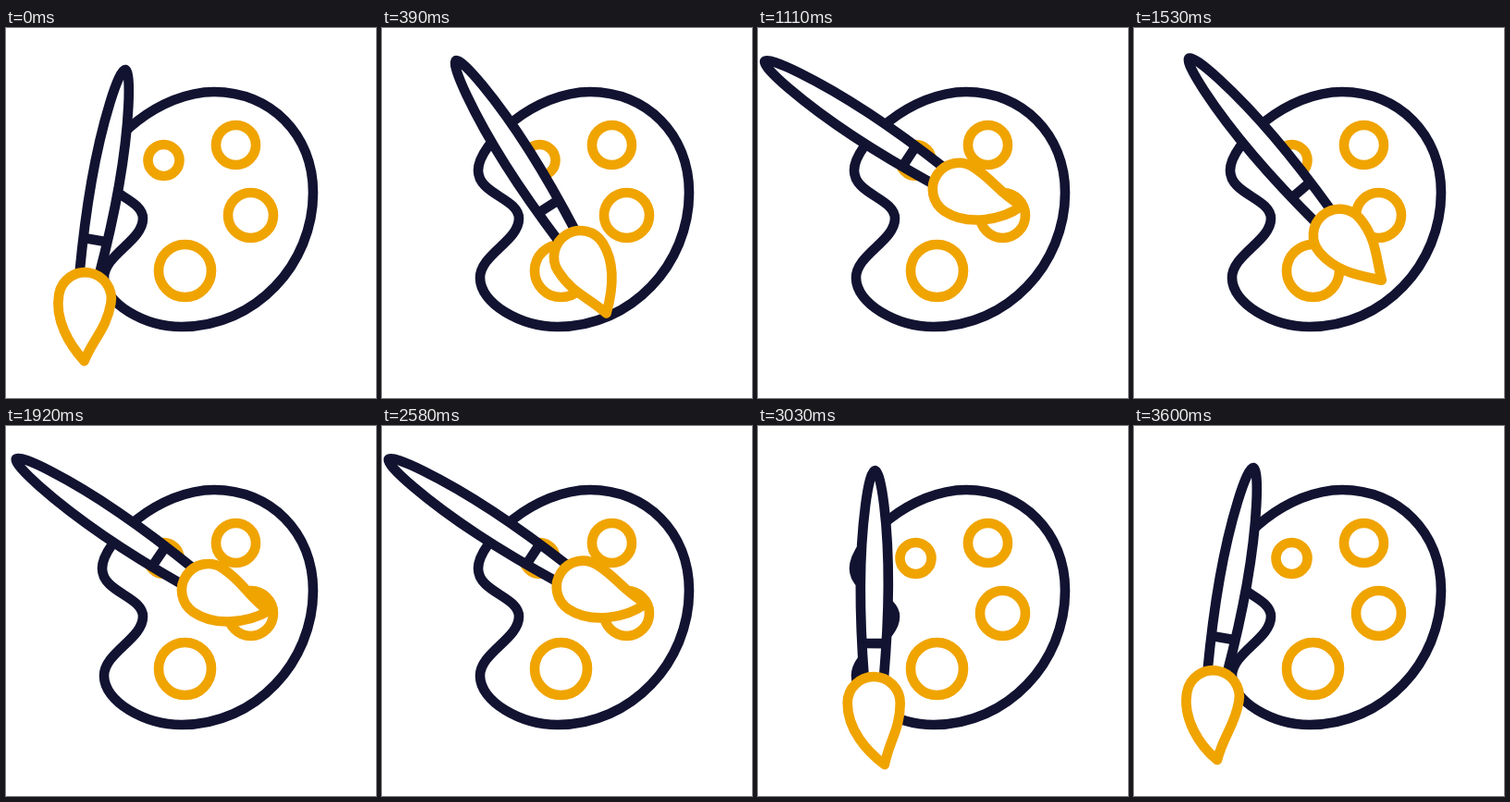
Animation of 400 by 400 pixels, one loop 5630 ms. Source, as an HTML page with a canvas:

```html
<!DOCTYPE html>
<html lang="en">
<head>
<meta charset="utf-8">
<title>Palette and brush</title>
<style>
  html, body { margin: 0; width: 100%; height: 100%; overflow: hidden; background: #fff; }
  canvas { display: block; width: 100%; height: 100%; }
</style>
</head>
<body>
<canvas id="stage"></canvas>
<script>
const SIZE = 400, LOOP = 5630, STEP = 30, MOTION_END = 3600;
const NAVY = '#121331', GOLD = '#f0a400';

const canvas = document.getElementById('stage');
const ctx = canvas.getContext('2d');
const ratio = window.devicePixelRatio || 1;
canvas.width = canvas.height = SIZE * ratio;

const palette = new Path2D(
  'M225 69C286 69 332 115 332 178C332 255 270 323 190 323' +
  'C150 323 106 298 106 270C106 245 148 230 148 206' +
  'C148 184 104 180 104 154C104 125 165 69 225 69Z');

// Brush space: origin at the handle end, y runs towards the bristles.
const BRISTLES = 222;
const handle = new Path2D(
  'M-10.5 226C-13 195 -15 165 -15 125C-15 60 -7 0 0 0' +
  'C7 0 15 60 15 125C15 165 13 195 10.5 226');
const band = new Path2D('M-12.5 187H12.5');

const settle = u => (1 - (1 - u) ** 3) ** 1.5;
const swing = u => u < 0.5 ? 4 * u ** 3 : 1 - 4 * (1 - u) ** 3;

// Stroke position: 0 is the brush at rest, 1 is the end of a paint stroke.
const moves = [
  { start: 0, end: 1080, to: 1, ease: settle },
  { start: 1080, end: 1410, to: 0.67, ease: swing },
  { start: 1410, end: 2160, to: 1, ease: settle },
  { start: 2550, end: 3300, to: -0.05, ease: swing },
  { start: 3300, end: MOTION_END, to: 0, ease: swing }
];

function strokeAt(t) {
  let p = 0;
  for (const { start, end, to, ease } of moves) {
    if (t <= start) break;
    p += (to - p) * ease(Math.min(1, (t - start) / (end - start)));
  }
  return p;
}

// The bristles trail behind the stroke, mostly on its way out.
function bendAt(t, p) {
  const speed = (strokeAt(t + 15) - strokeAt(t - 15)) / 30;
  const drag = 20000 * Math.max(speed, -speed / 8);
  return 16.5 + 6 * p - Math.min(30, drag);
}

function bristles(bend) {
  const r = 28.5, tip = 96;
  const path = new Path2D();
  path.arc(0, r + 1, r, Math.PI, 2 * Math.PI);
  const side = (s, ...c) => path.bezierCurveTo(...c);
  const lean = 0.4 * bend, lift = 0.5 * bend;
  path.bezierCurveTo(r, 58, 12 + lean, 76 - lift, bend, tip);
  path.bezierCurveTo(lean - 12, 76 + lift, -r, 58, -r, r + 1);
  path.closePath();
  return path;
}

function shape(path, color) {
  ctx.fillStyle = '#fff';
  ctx.strokeStyle = color;
  ctx.fill(path);
  ctx.stroke(path);
}

function well(x, y, r) {
  const ring = new Path2D();
  ring.arc(x, y, r, 0, 2 * Math.PI);
  shape(ring, GOLD);
}

function drawBrush(t) {
  const p = strokeAt(t);
  const tilt = -10 + 66.7 * p;
  ctx.translate(129 - 122 * p * p, 45 - 9 * p + 5.5 * Math.sin(2 * Math.PI * p));
  ctx.rotate(-tilt * Math.PI / 180);
  shape(handle, NAVY);
  shape(band, NAVY);
  ctx.translate(0, BRISTLES);
  shape(bristles(bendAt(t, p)), GOLD);
}

function draw(t) {
  ctx.setTransform(ratio, 0, 0, ratio, 0, 0);
  ctx.fillStyle = '#fff';
  ctx.fillRect(0, 0, SIZE, SIZE);
  ctx.lineWidth = 10.6;
  ctx.lineJoin = 'round';

  shape(palette, NAVY);
  well(170.5, 143, 17);
  well(248.5, 126.5, 21.5);
  well(264.5, 202.5, 24.5);
  well(193.5, 262.5, 28.5);
  drawBrush(Math.min(t, MOTION_END));
}

const start = performance.now();
function tick() {
  const t = (performance.now() - start) % LOOP;
  draw(Math.floor(t / STEP) * STEP);
  requestAnimationFrame(tick);
}
tick();
</script>
</body>
</html>
```
